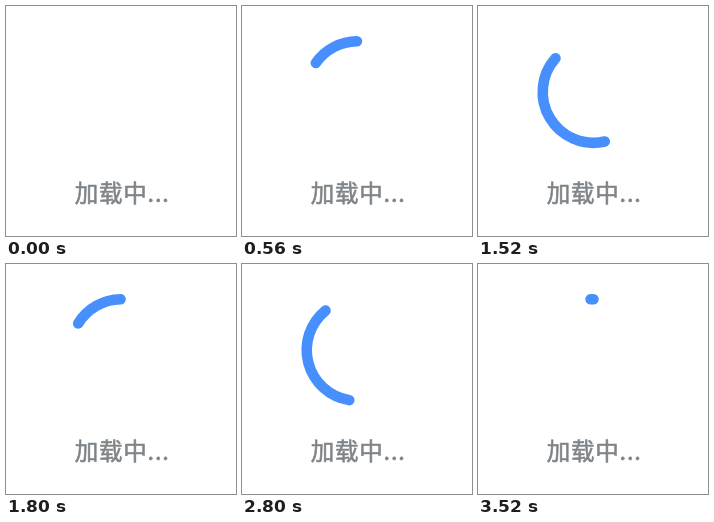
An HTML page that plays this animation: 230 px wide and 230 px high, repeating every 3.56 s.

```html
<!DOCTYPE html>
<html lang="zh-CN">
<head>
<meta charset="utf-8">
<style>
  html, body { margin: 0; width: 100%; height: 100%; overflow: hidden; background: #fff; }
  svg { display: block; width: 230px; height: 230px; }
  path { fill: none; stroke: #478ffd; stroke-width: 10.6; stroke-linecap: round; }
  text {
    font: 23.5px "Noto Sans CJK SC", "Noto Sans CJK", sans-serif;
    letter-spacing: 0.8px; fill: #7f8488; stroke: #7f8488; stroke-width: 0.6px;
  }
</style>
</head>
<body>
<svg viewBox="0 0 230 230">
  <path id="arc"/>
  <text x="68.7" y="196">加载中...</text>
</svg>
<script>
const LOOP = 3560, STEP = 40, TURN = 1254, HEAD_TIME = 610, TAIL_TIME = 1200;
const CX = 115.5, CY = 86, R = 50.8;
const arc = document.getElementById('arc');

// Cubic Bezier easing, solved by bisection
function bezier(x1, y1, x2, y2) {
  const at = (s, a, b) => 3 * (1 - s) ** 2 * s * a + 3 * (1 - s) * s * s * b + s ** 3;
  return x => {
    if (x >= 1) return 1;
    let lo = 0, hi = 1;
    for (let i = 0; i < 30; i++) {
      const mid = (lo + hi) / 2;
      if (at(mid, x1, x2) < x) lo = mid; else hi = mid;
    }
    return at(lo, y1, y2);
  };
}

const headEase = bezier(0.25, 0.25, 0, 1);
const tailEase = bezier(0.29, 0, 0, 1);

function point(turns) {
  const a = turns * 2 * Math.PI;
  return `${(CX + R * Math.sin(a)).toFixed(3)} ${(CY - R * Math.cos(a)).toFixed(3)}`;
}

function draw(time) {
  const phase = time % TURN;
  const head = headEase(phase / HEAD_TIME);
  const tail = tailEase(phase / TAIL_TIME);
  const large = head - tail > 0.5 ? 1 : 0;
  arc.setAttribute('d', phase > 0 && tail < 1
    ? `M${point(tail)} A${R} ${R} 0 ${large} 1 ${point(head)}` : '');
}

const start = performance.now();
function tick() {
  const time = (performance.now() - start) % LOOP;
  draw(Math.floor(time / STEP) * STEP);
  requestAnimationFrame(tick);
}
tick();
</script>
</body>
</html>
```
